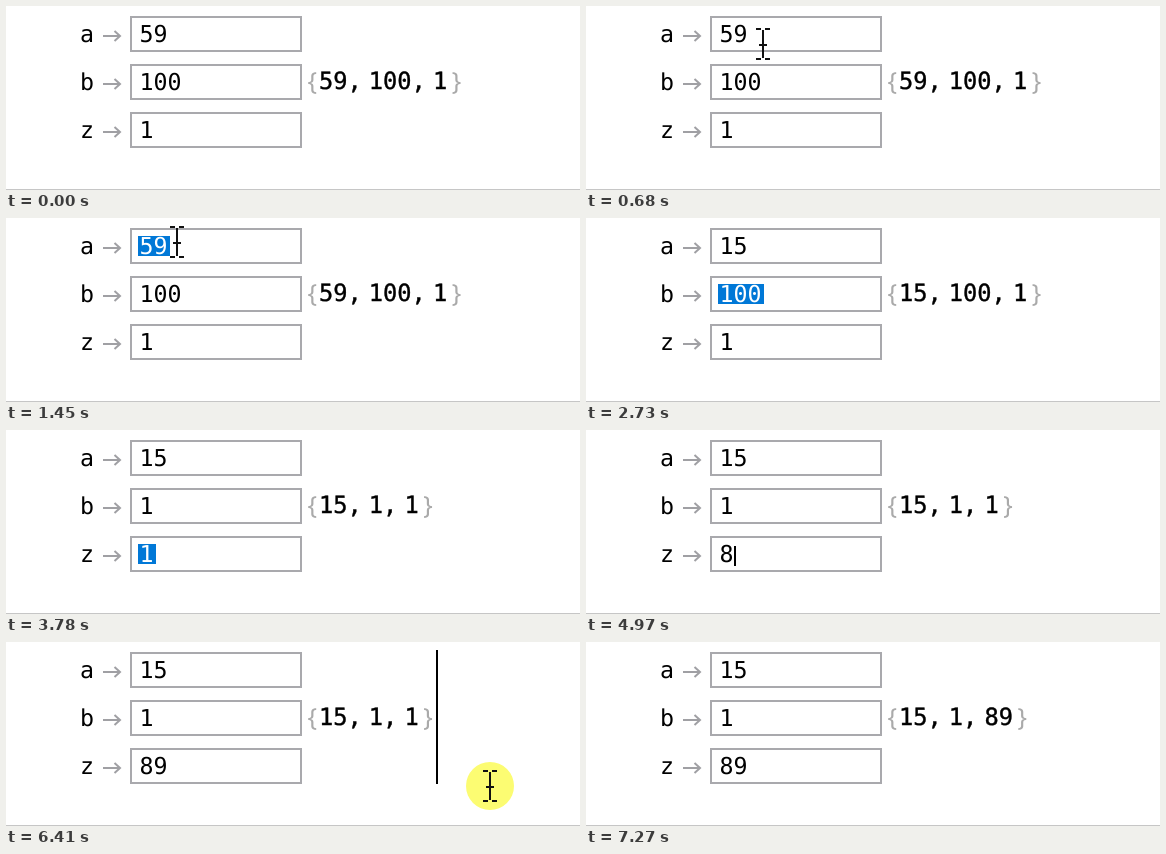
An HTML page for the animation above (7350 ms loop, 574x184 px).

```html
<!DOCTYPE html>
<html lang="en">
<head>
<meta charset="utf-8">
<title>Input fields</title>
<style>
html, body { margin: 0; width: 100%; height: 100%; overflow: hidden; background: #fff; }
svg { display: block; width: 574px; height: 184px; }
text { font: 23.26px "DejaVu Sans Mono", monospace; white-space: pre; text-rendering: geometricPrecision; }
.result { font-size: 23.67px; word-spacing: -7.1px; stroke: #000; stroke-width: .4px; }
.brace { font: 300 25px "Noto Sans", sans-serif; fill: #aaa; }
.lines { fill: none; stroke-width: 2; }
</style>
</head>
<body>
<svg id="stage" viewBox="0 0 574 184"></svg>
<script>
const LOOP = 7350;
const CHAR = 14;        // advance of a digit in a field
const TEXT_X = 134;     // left edge of the field text
const stage = document.getElementById('stage');

// Every track lists [start time, value...]; values hold until the next entry.
const fieldA = [[0, '59'], [2250, '1'], [2420, '15']];
const fieldB = [[0, '100'], [3530, '1']];
const fieldZ = [[0, '1'], [4970, '8'], [5120, '89']];
const result = [[0, '59, 100, 1'], [2730, '15, 100, 1'], [3780, '15, 1, 1'], [6490, '15, 1, 89']];

// row, then the first selected character (none: caret at the end)
const focus = [
  [0], [900, 0, 1], [980, 0, 0], [2250, 0], [2730, 1, 0], [3530, 1],
  [3780, 2, 0], [4970, 2], [5680], [6180, 2], [6410]
];
const cellCaret = [[0, false], [6410, true], [6960, false]];

// x, y, button pressed
const pointer = [
  [0],
  [210, 270, 156], [290, 190, 140], [370, 110, 115], [450, 73, 85],
  [520, 95, 50], [600, 140, 31], [680, 177, 38],
  [830, 177, 38, true], [900, 150, 33, true], [980, 117, 27, true], [1060, 97, 24, true],
  [1140, 91, 26], [1370, 130, 25], [1450, 171, 24], [2250],
  [5750, 240, 50], [5830, 394, 110], [6180, 415, 118], [6260, 455, 134],
  [6340, 484, 144], [6410, 484, 144, true], [6570, 484, 144],
  [6800, 483, 138], [6880, 481, 125], [6960, 478, 105], [7040]
];

const at = (track, t) => track.findLast(([start]) => start <= t).slice(1);

const rect = (x, y, w, h, fill) =>
  `<rect x="${x}" y="${y}" width="${w}" height="${h}" fill="${fill}"/>`;
const text = (x, y, content, attrs = '') => `<text x="${x}" y="${y}" ${attrs}>${content}</text>`;
const lines = (d, color, x = 0, y = 0) =>
  `<path class="lines" d="${d}" stroke="${color}" transform="translate(${x} ${y})"/>`;

function drawField(row, label, value, [focusRow, from]) {
  const top = 48 * row, base = top + 36;
  let out = text(74, base, label)
    + lines('M97 30H114M108.5 25L114 30L108.5 35', '#a0a0a4', 0, top)
    + `<rect class="lines" x="125" y="${top + 11}" width="170" height="34" stroke="#a9a9ad"/>`;
  const end = TEXT_X + CHAR * value.length;
  const selected = focusRow === row && from !== undefined;
  if (selected) {
    const left = from ? TEXT_X + CHAR * from : TEXT_X - 2;
    out += rect(left, top + 18, end + 2 - left, 20, '#0078d7');
  } else if (focusRow === row) {
    out += rect(end, top + 20, 2, 20, '#000');
  }
  const split = selected ? from : value.length;
  return out + text(TEXT_X - .6, base,
    `${value.slice(0, split)}<tspan fill="#fff">${value.slice(split)}</tspan>`);
}

function drawResult(list, caret) {
  const digits = list.replace(/\D/g, '').length;
  const end = 360.3 + 14.25 * digits;
  return text(301.5, 84, '{', 'class="brace"')
    + text(313, 82.5, list, 'class="result"')
    + text(end, 84, '}', 'class="brace"')
    + (caret ? rect(Math.round(end + 12.8), 8, 2, 134, '#000') : '');
}

function drawPointer([x, y, pressed]) {
  if (x === undefined) return '';
  const halo = pressed
    ? `<circle cx="${x}" cy="${y}" r="24" fill="#fcfc72" style="mix-blend-mode:multiply"/>` : '';
  return halo + lines('M-7-15H-2M2-15H7M0-14V14M-7 15H-2M2 15H7M-4 1H4', '#111', x, y);
}

let shown = '';
function render(t) {
  const active = at(focus, t);
  const picture = rect(0, 0, 574, 184, '#fff')
    + rect(0, 183, 574, 1, '#c6c6c6')
    + drawField(0, 'a', at(fieldA, t)[0], active)
    + drawField(1, 'b', at(fieldB, t)[0], active)
    + drawField(2, 'z', at(fieldZ, t)[0], active)
    + drawResult(at(result, t)[0], at(cellCaret, t)[0])
    + drawPointer(at(pointer, t));
  if (picture !== shown) stage.innerHTML = shown = picture;
}

const begin = performance.now();
function tick() {
  render((performance.now() - begin) % LOOP);
  requestAnimationFrame(tick);
}
tick();
</script>
</body>
</html>
```
